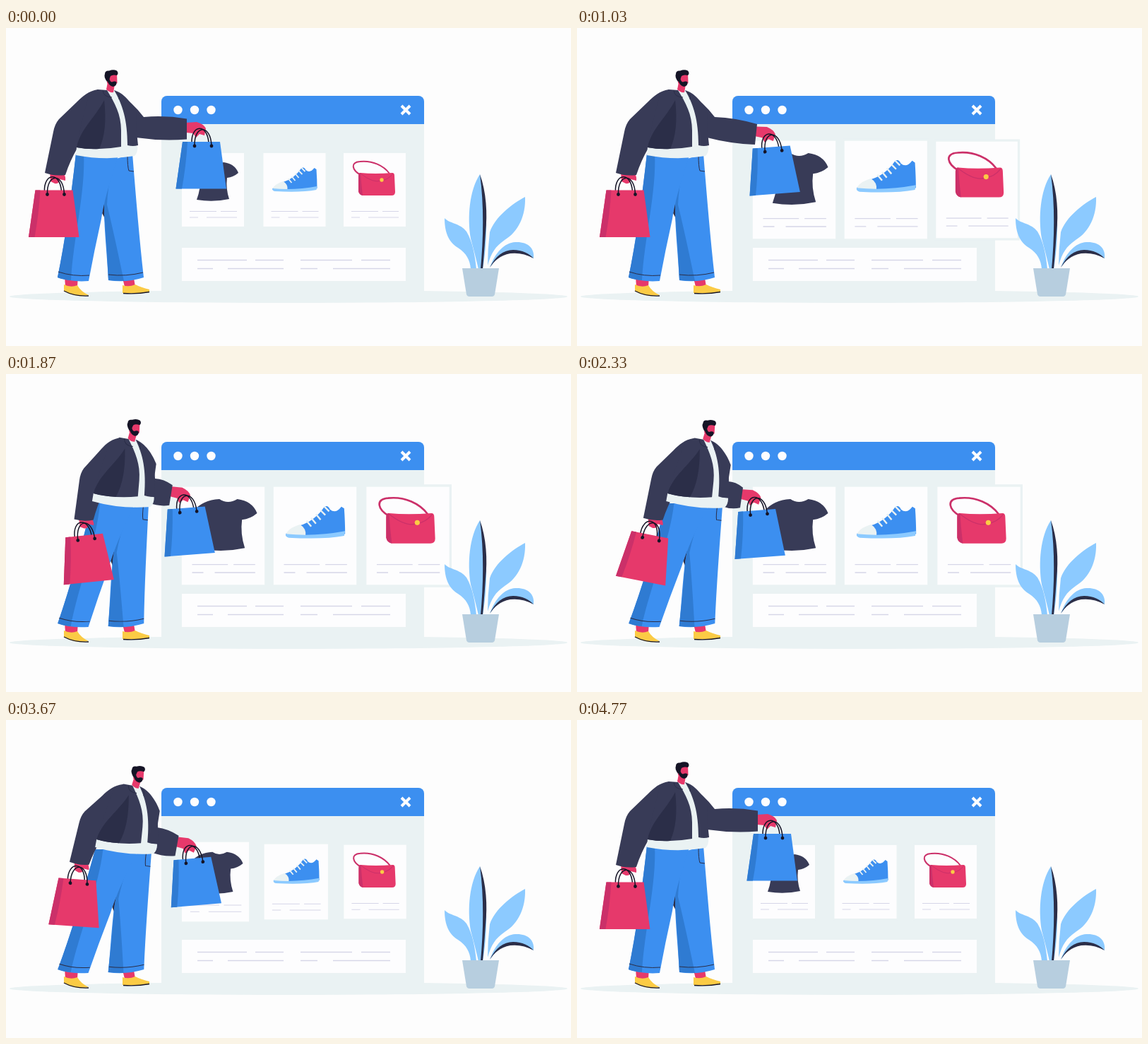
These frames come from a looping animation (800x450 px, 4810 ms). An HTML page with a canvas:

```html
<!DOCTYPE html>
<html lang="en">
<head>
<meta charset="utf-8">
<title>Online shopping</title>
<style>
  html, body { margin: 0; height: 100%; overflow: hidden; background: #fdfdfd; }
  canvas { display: block; width: 100vw; height: 100vh; }
</style>
</head>
<body>
<canvas id="stage" width="800" height="450"></canvas>
<script>
const ctx = document.getElementById('stage').getContext('2d');
const LOOP = 4810;
const C = {
  page: '#fdfdfd', pale: '#eaf2f3', white: '#fdfdfe', line: '#d6d6e8',
  blue: '#3c8ff0', navy: '#2f7bd2', sky: '#8ccaff', red: '#e6396b', crimson: '#cb3069',
  jacket: '#383b57', shade: '#2b2e48', black: '#151426',
  yellow: '#fbcb45', pot: '#b7cedf'
};

// Pairs of time and value
const tracks = {
  bagX: [0, 276, 250, 276, 1030, 273.5, 1870, 253.5, 2300, 253, 3030, 254, 3670, 262, 4270, 280, 4790, 276],
  bagY: [0, 146, 250, 146, 1030, 153.5, 1870, 174.5, 2300, 178, 3030, 178, 3670, 181, 4270, 164, 4790, 146],
  bagTurn: [0, 0, 250, 0, 1030, -4.5, 1870, -4.5, 3030, -3.5, 3670, -5, 4270, 11, 4790, 0],
  cuffTurn: [0, 0, 250, 0, 1030, 6, 1870, 9, 3030, 6, 3670, 10, 4270, 13, 4790, 0],
  handX: [0, 70, 1030, 70, 1870, 111, 3030, 103, 3670, 104, 4270, 75.5, 4790, 70],
  handY: [0, 213, 1030, 213, 1870, 212, 3030, 210, 3670, 209, 4270, 207.5, 4790, 213],
  swing: [0, 0, 300, -2, 780, 4.5, 1030, 0, 1500, 5, 1870, -6, 2400, 12, 2750, 5,
    3030, 9, 3220, 12, 3670, 4, 4270, 10.5, 4400, 12, 4790, 0]
};

// Monotone cubic interpolation
function track(name, t) {
  const k = tracks[name], last = k.length / 2 - 1;
  if (t >= k[last * 2]) return k[last * 2 + 1];
  let i = 0;
  while (t >= k[i * 2 + 2]) i++;
  const slope = j => (k[j * 2 + 3] - k[j * 2 + 1]) / (k[j * 2 + 2] - k[j * 2]);
  const tangent = j => {
    if (j < 1 || j >= last) return 0;
    const a = slope(j - 1), b = slope(j);
    return a * b <= 0 ? 0 : 2 * a * b / (a + b);
  };
  const h = k[i * 2 + 2] - k[i * 2], u = (t - k[i * 2]) / h, v = 1 - u;
  return k[i * 2 + 1] * v * v * (1 + 2 * u) + k[i * 2 + 3] * u * u * (3 - 2 * u)
    + h * u * v * (v * tangent(i) - u * tangent(i + 1));
}

const ease = u => {
  u = Math.min(1, Math.max(0, u));
  return u < .5 ? 4 * u ** 3 : 1 - 4 * (1 - u) ** 3;
};
const pulse = (t, up, down, span) => ease((t - up) / span) - ease((t - down) / span);
const mix = (a, b, u) => a + (b - a) * u;

function fill(d, color) {
  ctx.fillStyle = color;
  ctx.fill(new Path2D(d));
}
function stroke(d, color, width = 1) {
  ctx.strokeStyle = color;
  ctx.lineWidth = width;
  ctx.stroke(new Path2D(d));
}
function box(x, y, w, h, color, r = 0) {
  ctx.fillStyle = color;
  ctx.beginPath();
  ctx.roundRect(x, y, w, h, r);
  ctx.fill();
}
function dot(x, y, r, color, ry = r) {
  ctx.fillStyle = color;
  ctx.beginPath();
  ctx.ellipse(x, y, r, ry, 0, 0, 7);
  ctx.fill();
}
function within(matrix, draw) {
  ctx.save();
  ctx.transform(matrix.a, matrix.b, matrix.c, matrix.d, matrix.e, matrix.f);
  draw();
  ctx.restore();
}
const at = (x, y, turn = 0, scale = 1) => new DOMMatrix().translate(x, y).rotate(turn).scale(scale);

function drawWindow() {
  dot(400, 380, 395, C.pale, 9);
  box(220, 96, 372, 285, C.pale, [8, 8, 0, 0]);
  box(220, 96, 372, 40, C.blue, [8, 8, 0, 0]);
  for (const x of [243.5, 267, 290.5]) dot(x, 116, 6.2, C.white);
  stroke('M560 110l12 12m0-12l-12 12', C.white, 4);
  box(249, 311, 317, 47, C.white);
  stroke('M271 328.5H341M353 328.5H393M417 328.5H490M503 328.5H544' +
    'M271 340.5H293M314 340.5H393M417 340.5H441M463 340.5H544', C.line, 1.4);
}

function shirt() {
  fill('M-4-39Q5-33 15-39Q31-37 36-24Q29-18 20-17Q18-2 23 13Q0 18-23 14Q-17-2-18-18Q-26-20-32-26Q-22-38-4-39Z', C.jacket);
}

function shoe() {
  fill('M-31-2Q-25-7-16-11Q0-16 10-31Q14-33 16-28Q22-23 28-31L31-29Q32-14 32-2L0 1L-31 0Z', C.blue);
  fill('M-31-1Q-29-8-16-12Q-9-8-10 0Z', C.pale);
  fill('M-31-2Q0 1 32-5L31 0Q10 4-28 2Q-32 1-31-2Z', C.sky);
  stroke('M-9-16l5 6M-4-19l5 6M1-23l5 6M6-27l5 5M10-31l5 5', C.pale, 1.8);
}

function handbag() {
  stroke('M-20-21C-32-28-35-39-21-40C-3-42 13-34 21-23', C.crimson, 2);
  fill('M-20-24Q0-22 25-24Q28-24 28-20L29 3Q29 8 24 8L-17 8Q-22 7-23 2L-23-20Q-23-24-20-24Z', C.red);
  fill('M-20-24Q-19-8-17 8Q-22 7-23 2L-23-20Q-23-24-20-24Z', C.crimson);
  stroke('M-20-23Q-2-9 9-13Q19-14 26-23', C.crimson, 1);
  dot(10, -14, 2.7, C.yellow);
}

const cards = [
  { from: 293, to: 307.5, item: shirt },
  { from: 408.5, to: 437.5, item: shoe },
  { from: 522, to: 569, item: handbag }
];
function drawCards(t) {
  cards.forEach(({ from, to, item }, i) => {
    const grow = pulse(t, 30 + 125 * i, 3065 - 125 * i, 1000);
    within(at(mix(from, to, grow), 229, 0, 1 + grow / 3), () => {
      box(-46.5, -54.5, 93, 109, C.pale);
      box(-44, -52, 88, 104, C.white);
      item();
      stroke('M-33 30.5H5M11 30.5H34M-33 39H-21M-9 39H34', C.line, 1);
    });
  });
}

function drawPlant() {
  fill('M621 269C628 277 643 276 652 288C661 303 664 322 666 341H658C657 328 652 319 640 311C625 302 621 286 621 269Z', C.sky);
  fill('M671 207C656 230 653 268 658 298Q664 320 669 341H675C681 310 684 250 671 207Z', C.sky);
  fill('M671 207C680 232 682 262 679 290Q677 318 675 341H672C676 300 677 250 671 207Z', C.shade);
  fill('M735 239C716 249 692 268 685 289Q682 313 682 336C687 318 693 309 706 300C726 288 736 265 735 239Z', C.sky);
  fill('M685 339C693 317 706 304 721 303C738 302 749 311 747 326Q731 314 714 318C699 321 692 329 685 339Z', C.sky);
  fill('M685 339C693 323 704 314 718 314C731 314 741 319 747 326Q731 317 714 319C699 322 692 329 685 339Z', C.shade);
  fill('M646 340H698L692 377Q691 380 688 380H656Q653 380 652 377Z', C.pot);
}

function drawLegs(p) {
  fill('M83 351H102L101 366H84Z M165 354H181L183 366H168Z', C.red);
  fill('M82 363Q92 368 101 364Q106 373 117 378Q98 382 82 372Z', C.yellow);
  fill('M165 364Q174 367 183 363Q191 367 203 370L203 374Q184 377 165 375Z', C.yellow);
  stroke('M82 372Q97 380 117 379M166 375.5Q185 377 203 373.5', C.black, 1.3);
  const lean = 27 * p / 175, drop = 5 * p / 175;
  within(new DOMMatrix([1, 0, -lean, 1 - drop, lean * 355, drop * 355]), () => {
    fill('M145 195L136 262L143 275L155 210Z', C.shade);
    fill('M140 190L179 178C184 240 189 300 195 353Q170 361 145 357C143 320 139 285 139 258Z', C.blue);
    fill('M150 200C141 228 137 250 140 275Q143 315 145 357L167 358C157 310 148 270 143 250Q144 225 150 200Z', C.navy);
    fill('M99 178H160C148 215 140 240 135 270Q125 315 117 358Q94 360 73 353C84 300 92 240 99 178Z', C.blue);
    fill('M99 178H110C113 230 95 300 92 357Q80 356 73 353C84 300 92 240 99 178Z', C.navy);
    stroke('M74 345Q95 352 118 350M145 349Q170 352 194 346M172 180Q172 196 174 202L181 203', C.shade, 1);
  });
}

function drawHead() {
  fill('M144 77L154 80L152 91Q147 92 142 87Z', C.red);
  fill('M143 64H157L157.5 78Q151 83 143 78Z', C.red);
  fill('M143 76Q138 69 140 65Q140 60 146 60.5Q152 58 157 60.5Q160 64 157 67Q151 65.5 148 68L146.5 72Z', C.black);
  fill('M142 71L146 70Q147 76 150 76.5Q154 74.5 156.5 76.5Q157 82 151.5 83Q145 82 142 71Z', C.black);
}

function drawTorso() {
  fill('M141 88L155 88Q172 110 174 166L186 167Q187 176 182 181Q140 188 99 180L100 168L150 165Z', C.pale);
  fill('M130 87L143 88C154 106 163 122 163 145V168Q130 174 100 169C105 140 112 115 117 96Z', C.jacket);
  fill('M139 102C127 126 105 143 100 169Q115 172 132 171Q144 145 139 102Z', C.shade);
  fill('M153 88C167 92 179 107 185 120L184 138L187 166Q180 168 172 166C172 130 165 108 153 88Z', C.jacket);
  stroke('M137 88Q138 98 150 98M156 91Q162 94 160 101', C.shade, 1);
  drawHead();
}

function drawSleeve() {
  fill('M62 203L81 204Q85 211 84 216L76 214Q76 221 69 220L63 217Z', C.red);
  fill('M130 87C117 89 109 96 100 105L75 129Q69 136 67 147L55 205Q69 210 84 208Q91 187 101 170L138 105Z', C.jacket);
}

function drawFrontArm(p, x, y, turn, torso) {
  within(at(x, y, turn), () =>
    fill('M-21-12L-6-13Q4-10 7-4L5 6L-2 4L-7 9L-11 3L-21 2Z', C.red));
  const a = turn * Math.PI / 180, dx = 14.5 * Math.sin(a), dy = -14.5 * Math.cos(a);
  const cx = x - 20, cy = y - 3;
  const shoulder = torso.transformPoint(new DOMPoint(158, 91));
  const bend = torso.transformPoint(new DOMPoint(180, 106));
  const ex = mix(195, 214, p), ey = mix(126, 152, p);
  const bx = mix(184, 205, p), by = mix(155, 187, p);
  fill(`M${shoulder.x} ${shoulder.y}Q${bend.x} ${bend.y} ${ex} ${ey}
    Q${(ex + cx + dx) / 2} ${(ey + cy + dy) / 2 - 4} ${cx + dx} ${cy + dy}L${cx - dx} ${cy - dy}
    Q${(bx + cx - dx) / 2} ${(by + cy - dy) / 2 + 4} ${bx} ${by}Z`, C.jacket);
}

function drawBag(x, y, turn, color, side) {
  within(at(x, y, turn), () => {
    stroke('M-14 17C-15-9 8-11 10 17', C.black, 1.5);
    fill('M-27 15.5H26L35 82H-36.5Z', color);
    fill('M-27 15.5H-20Q-22 50-28 82H-36.5Z', side);
    stroke('M-10 21.5C-11-9 13-10 14 21.5', C.black, 1.5);
    dot(-10, 21.5, 2.4, C.black);
    dot(14, 21.5, 2.4, C.black);
  });
}

function drawShopper(t) {
  const v = name => track(name, t);
  const p = pulse(t, 1150, 3685, 1090);
  const torso = at(140 + 27 * p, 180 + 4 * p, 5.7 * p).translate(-140, -180);
  drawLegs(p);

  // The sleeve turns about the shoulder so that its hand meets the red bag
  const shoulder = torso.transformPoint(new DOMPoint(130, 100));
  const hx = v('handX'), hy = v('handY');
  const dx = hx - shoulder.x, dy = hy - shoulder.y;
  const turn = (Math.atan2(dy, dx) - Math.atan2(113, -60)) * 180 / Math.PI;
  const reach = Math.hypot(dx, dy) / Math.hypot(113, 60);
  within(at(shoulder.x, shoulder.y, turn, reach).translate(-130, -100), drawSleeve);

  const bx = v('bagX'), by = v('bagY');
  drawFrontArm(p, bx, by, v('cuffTurn'), torso);
  within(torso, drawTorso);
  drawBag(hx - 1.5, hy + 1, v('swing'), C.red, C.crimson);
  drawBag(bx + 1, by - .5, v('bagTurn'), C.blue, C.navy);
}

function frame(now) {
  const t = now % LOOP;
  ctx.fillStyle = C.page;
  ctx.fillRect(0, 0, 800, 450);
  drawWindow();
  drawCards(t);
  drawPlant();
  drawShopper(t);
  requestAnimationFrame(frame);
}
requestAnimationFrame(frame);
</script>
</body>
</html>
```
